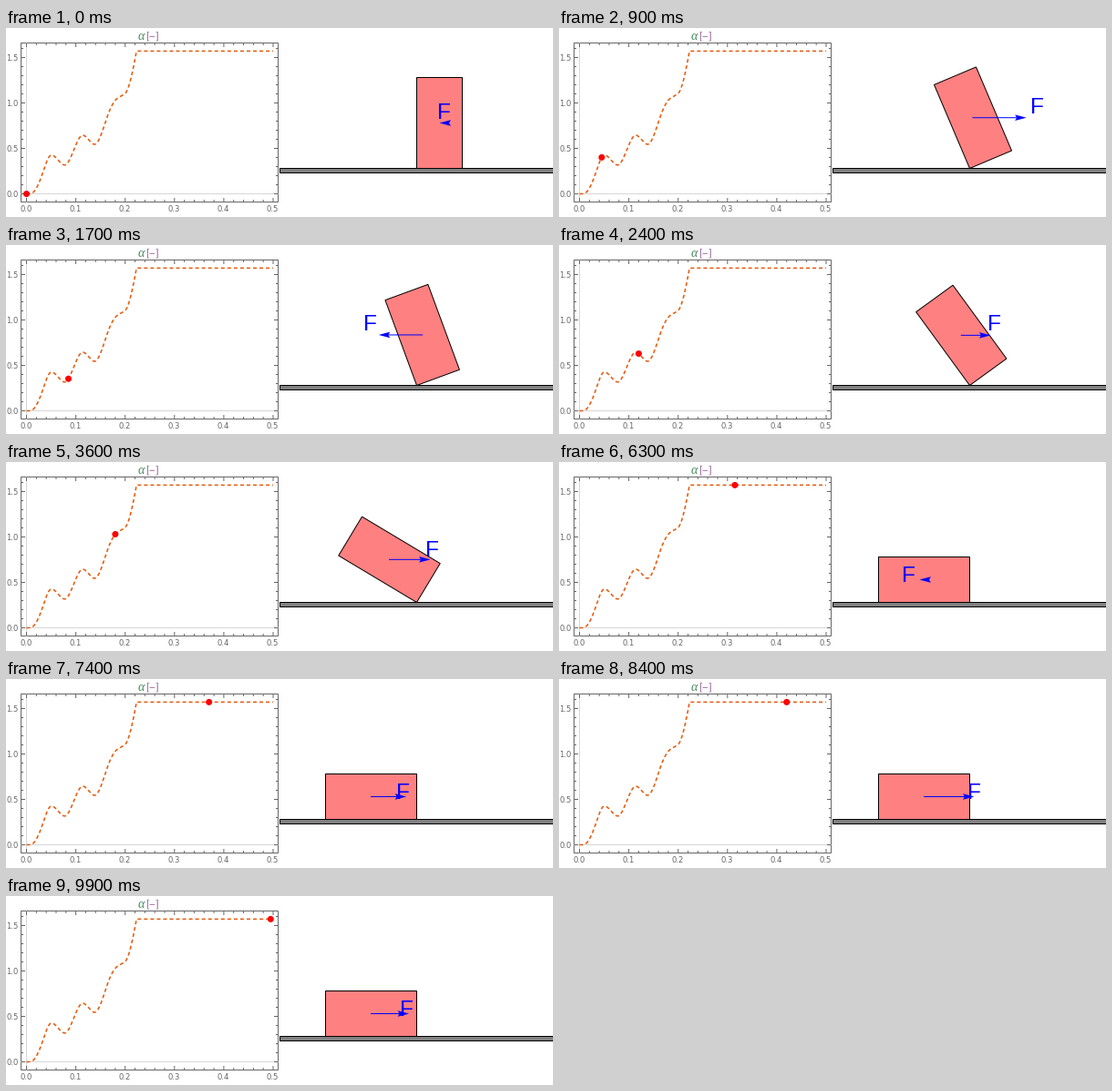
A matplotlib script for the animation above (10 s loop, 600 by 208 pixels).

```python
import numpy as np
import matplotlib.pyplot as plt
from matplotlib.animation import FuncAnimation
from matplotlib.collections import LineCollection
from matplotlib.patches import Circle, Polygon, Rectangle

# Coordinates already sit on pixel centres, so snapping would shift them.
plt.rcParams["path.snap"] = False

W, H, DPI = 600, 208, 100
FRAMES, INTERVAL, DT = 100, 100, 0.005
PX = 72 / DPI  # points per pixel

X0, Y0, SX, SY = 22.5, 182.5, 541, 100  # plot origin and scales
LEFT, RIGHT, TOP, BOTTOM = 16.5, 298.5, 16.5, 191.5
PIVOT = np.array([450.5, 154.5])
BLUE, GREY, ORANGE = "#0000ff", "#666666", "#e65c0e"

# time, tilt angle, angular velocity
KNOTS = np.array([
    (0, 0, 0), (0.007, 0, 0), (0.0315, 0.21, 16), (0.0505, 0.427, 0),
    (0.0775, 0.317, 0), (0.114, 0.645, 0), (0.138, 0.545, 0),
    (0.16, 0.79, 17), (0.18, 1.03, 6.5), (0.19, 1.07, 3.2),
    (0.2, 1.105, 5), (0.223, np.pi / 2, 30),
])


def tilt(t):
    """Tilt of the block, cubic Hermite until it lies flat."""
    T, A, V = KNOTS.T
    t = np.asarray(t, float)
    i = np.clip(np.searchsorted(T, t, side="right") - 1, 0, len(T) - 2)
    d = T[i + 1] - T[i]
    u = (t - T[i]) / d
    a = (A[i] * (1 - 3 * u**2 + 2 * u**3) + A[i + 1] * (3 * u**2 - 2 * u**3)
         + d * V[i] * u * (1 - u)**2 + d * V[i + 1] * u**2 * (u - 1))
    return np.where(t < T[-1], a, np.pi / 2)


def force(t):
    return -60 * np.sin(100 * t)


def to_px(t, a):
    return X0 + SX * t, Y0 - SY * a


def block_px(points, a):
    """Block coordinates (y up, pivot at 0, 0) to stage pixels."""
    x, y = np.asarray(points, float).T
    c, s = np.cos(a), np.sin(a)
    return PIVOT + np.column_stack([x * c - y * s, -(x * s + y * c)])


fig = plt.figure(figsize=(W / DPI, H / DPI), dpi=DPI, facecolor="white")
ax = fig.add_axes([0, 0, 1, 1])
ax.set_xlim(0, W)
ax.set_ylim(H, 0)
ax.axis("off")


def label(x, y, s, size, **kw):
    return ax.text(x, y, s, fontsize=size * PX, va="baseline", **kw)


def draw_plot():
    ax.plot([X0, X0], [TOP, BOTTOM], color="#d6d6d6", lw=PX)
    ax.plot([LEFT, RIGHT], [Y0, Y0], color="#d6d6d6", lw=PX)
    t = np.linspace(0, 0.5, 1001)
    ax.plot(*to_px(t, tilt(t)), color=ORANGE, lw=1.6 * PX,
            dashes=(2.5, 1.9), dash_capstyle="butt")
    ax.add_patch(Rectangle((LEFT, TOP), RIGHT - LEFT, BOTTOM - TOP,
                           fill=False, ec=GREY, lw=PX))
    ticks = []
    for i in range(26):
        x, n = X0 + SX * i * 0.02, 2.5
        if i % 5 == 0:
            n = 4.5
            label(x - 0.5, 202.5, f"{i * 0.02:.1f}", 8.5, ha="center",
                  color=GREY, family="DejaVu Sans")
        ticks += [[(x, BOTTOM), (x, BOTTOM - n)], [(x, TOP), (x, TOP + n)]]
    for i in range(17):
        y, n = Y0 - SY * i * 0.1, 2.5
        if i % 5 == 0:
            n = 4.5
            label(13.5, y + 3.2, f"{i * 0.1:.1f}", 8.5, ha="right",
                  color=GREY, family="DejaVu Sans")
        ticks += [[(LEFT, y), (LEFT + n, y)], [(RIGHT, y), (RIGHT - n, y)]]
    ax.add_collection(LineCollection(ticks, colors=GREY, linewidths=PX))
    label(145, 13, "α", 14, color="#438958", style="italic",
          family="Liberation Serif")
    label(153.5, 13, "[−]", 12, color="#8a4f8a", family="Liberation Serif")


draw_plot()
ax.add_patch(Rectangle((300.5, 154.5), 310, 5, fc="#808080", ec="black",
                       lw=PX, zorder=3))
block = ax.add_patch(Polygon(np.zeros((4, 2)), fc="#ff8080", ec="black",
                             lw=PX, zorder=4))
letter = label(0, 0, "F", 24.5, ha="center", color=BLUE, zorder=5,
               family="Liberation Sans")
shaft, = ax.plot([], [], color=BLUE, lw=PX, zorder=6)
head = ax.add_patch(Polygon(np.zeros((4, 2)), fc=BLUE, ec="none", zorder=6))
dot = ax.add_patch(Circle((X0, Y0), 3.5, fc="red", ec="none", zorder=7))

CORNERS = [(0, 0), (50, 0), (50, 100), (0, 100)]
HEAD = np.array([(0, 0), (-12.5, -3.3), (-10.5, 0), (-12.5, 3.3)])


def update(k):
    t = k * DT
    a, f = tilt(t), force(t)
    dot.center = to_px(t, a)
    block.set_xy(block_px(CORNERS, a))
    (cx, cy), (lx, ly) = block_px([(25, 50), (29.8, 61)], a)
    tip = cx + f
    side = 1 if f > 0 else -1
    back = tip - 10 * side
    shaft.set_data([cx, back if abs(f) > 10 else cx], [cy, cy])
    head.set_xy(HEAD * (side, 1) + (tip, cy))
    letter.set_position((lx + 1.2 * f, ly + 6.8))
    return block, letter, shaft, head, dot


anim = FuncAnimation(fig, update, frames=FRAMES, interval=INTERVAL,
                     init_func=lambda: update(0), repeat=True,
                     repeat_delay=0, blit=False)
plt.show()
```
